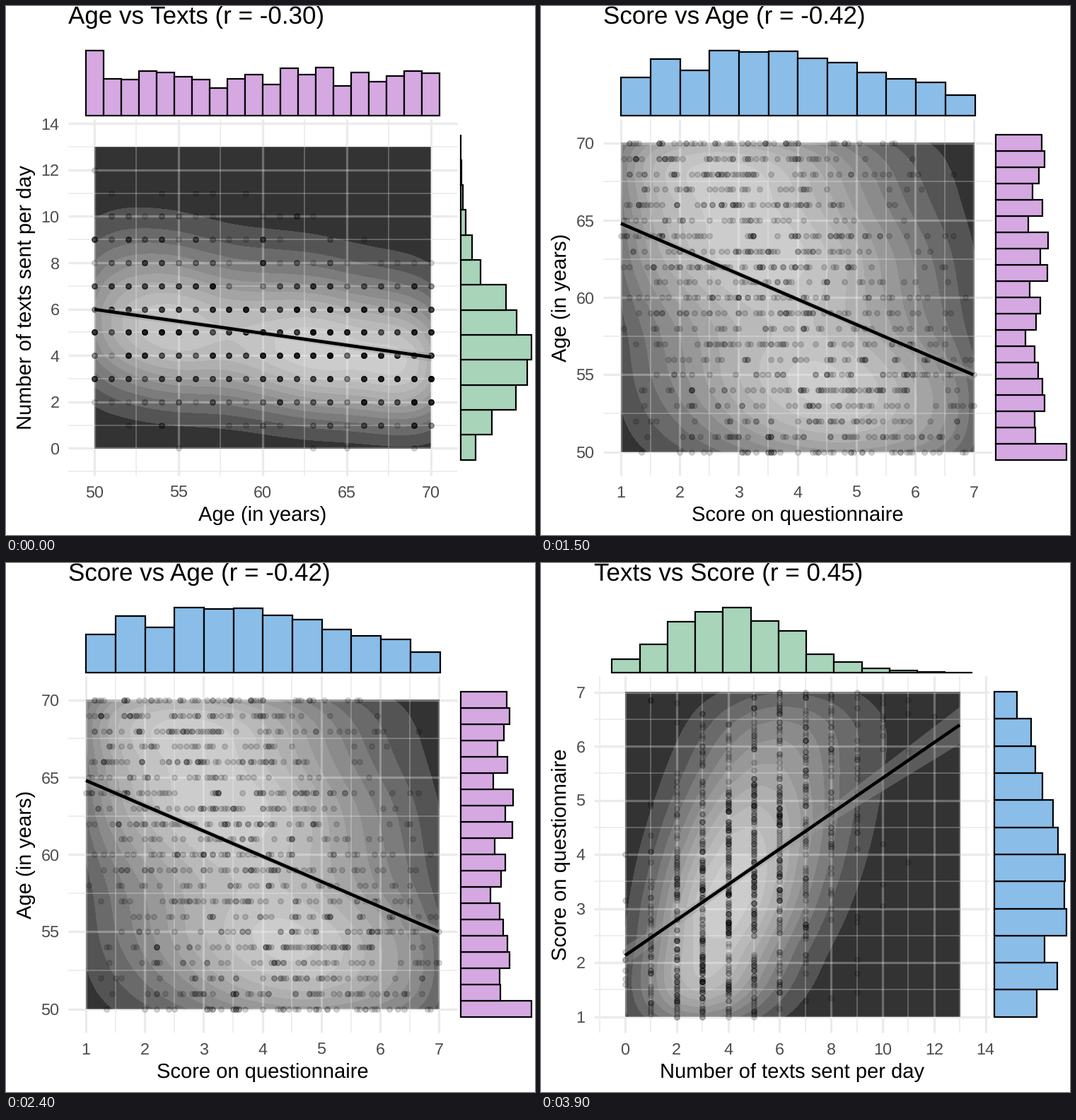
A matplotlib script for the animation above (4500 ms loop, 748x748 px).

```python
import math

import numpy as np
import matplotlib.pyplot as plt
from matplotlib.animation import FuncAnimation

SIZE, DPI = 748, 100
PX = 72 / DPI  # points per pixel
plt.rcParams["font.family"] = "Liberation Sans"
plt.rcParams["text.hinting"] = "none"

PURPLE, GREEN, BLUE = "#d5a8e2", "#a8d4ba", "#8abde8"
TOP, BOTTOM = 160, 664
PEOPLE, LEVELS = 1000, 11
DOT_ALPHA = 0.15

# Histogram heights relative to the tallest bar
AGE = [1, .56, .55, .69, .66, .60, .55, .42, .57, .63,
       .48, .73, .63, .74, .46, .66, .52, .61, .69, .65]
TEXTS = [.21, .44, .78, .94, 1, .79, .64, .28, .16, .07, .035, .015, .005]
SCORE = [.585, .87, .695, 1, .973, .984, .885, .815, .665, .567, .507, .317]

# Possible values of each variable and how often they occur
ages, texts, scores = np.arange(50, 71), np.arange(14), np.linspace(1, 7, 121)
age_weight = np.array([0.5, 0.5] + AGE[1:])  # the first bar holds two ages
score_weight = np.interp(scores, np.arange(1.25, 7, 0.5), SCORE)

# Smoothing width of the density for each variable
AGE_H, TEXTS_H, SCORE_H = 1.65, 0.57, 0.41

fig = plt.figure(figsize=(SIZE / DPI, SIZE / DPI), dpi=DPI, facecolor="white")


def grey(k):
    lo, hi = 0.2**2.2, 0.8**2.2
    return str((lo + (hi - lo) * k / (LEVELS - 1)) ** (1 / 2.2))


def bell(z):
    return np.exp(-z * z / 2)


def text_chances(mean, n=26):
    """Binomial chance of each number of texts, one row per mean."""
    p = mean[:, None] / n
    ways = np.array([math.comb(n, int(t)) for t in texts])
    return ways * p**texts * (1 - p) ** (n - texts)


class Plot:
    """One scatter plot with marginal histograms, laid out in pixels."""

    def __init__(self, left, right, x0, kx, y0, ky):
        self.left, self.right = left, right
        self.x = lambda v: x0 + kx * np.asarray(v)
        self.y = lambda v: y0 - ky * np.asarray(v)
        self.ax = fig.add_axes([0, 0, 1, 1])
        self.ax.set(xlim=(0, SIZE), ylim=(SIZE, 0))
        self.ax.axis("off")

    def lines(self, xs, ys, xspan, yspan, **style):
        self.ax.vlines(self.x(xs), *yspan, **style)
        self.ax.hlines(self.y(ys), *xspan, **style)

    def grid(self, xs, ys, xarea, yarea, width):
        """Grey lines on the panel, translucent white ones on the density."""
        self.lines(xs, ys, (self.left, self.right), (TOP, BOTTOM),
                   lw=width * PX, color="#ebebeb", zorder=1)
        inside = [v[(v >= a) & (v <= b)] for v, (a, b) in ((xs, xarea), (ys, yarea))]
        self.lines(*inside, self.x(xarea), self.y(yarea),
                   lw=width * PX, color="white", alpha=0.29, zorder=4)

    def density(self, joint, xs, ys, hx, hy):
        gx, gy = np.linspace(xs[0], xs[-1], 140), np.linspace(ys[0], ys[-1], 140)
        z = (bell((gx[:, None] - xs) / hx) @ joint @ bell((ys[:, None] - gy) / hy)).T
        self.ax.contourf(self.x(gx), self.y(gy), z,
                         levels=np.linspace(0, z.max() * 1.001, LEVELS + 1),
                         colors=[grey(k) for k in range(LEVELS)], zorder=2)

    def dots(self, joint, xs, ys, seed):
        rng = np.random.default_rng(seed)
        pick = rng.choice(joint.size, PEOPLE, p=joint.ravel() / joint.sum())
        i, j = np.unravel_index(pick, joint.shape)
        self.ax.scatter(self.x(xs[i]), self.y(ys[j]), s=(7.4 * PX) ** 2, lw=1.5 * PX,
                        fc=(0, 0, 0, DOT_ALPHA), ec=(0, 0, 0, DOT_ALPHA), zorder=5)

    def trend(self, start, end, mid, half, spread):
        (xa, ya), (xb, yb) = start, end
        x = np.linspace(xa, xb, 60)
        y = ya + (yb - ya) * (x - xa) / (xb - xa)
        w = np.hypot(half, spread * (x - mid))
        self.ax.fill_between(x, y - w, y + w, color="0.6", alpha=0.4, lw=0, zorder=6)
        self.ax.plot(x, y, color="black", lw=4.6 * PX, solid_capstyle="butt", zorder=7)

    def top_bars(self, heights, color, xa, xb):
        w = (xb - xa) / len(heights)
        self.ax.bar(xa + w * np.arange(len(heights)), -92 * np.array(heights), w,
                    bottom=155, align="edge", fc=color, ec="black", lw=2.2 * PX)

    def side_bars(self, widths, color, base, full, ya=641.7, yb=182.2):
        h = (yb - ya) / len(widths)
        self.ax.barh(ya + h * np.arange(len(widths)), full * np.array(widths), h,
                     left=base, align="edge", fc=color, ec="black", lw=2.2 * PX)

    def text(self, x, y, s, px, **kw):
        self.ax.text(x, y, s, fontsize=px * PX, va="baseline",
                     rotation_mode="anchor", **kw)

    def labels(self, title, xlabel, ylabel, xticks, yticks):
        self.text(self.left, 25, title, 35)
        self.text((self.left + self.right) / 2, 728, xlabel, 29.17, ha="center")
        self.text(35.5, (TOP + BOTTOM) / 2, ylabel, 29.17, ha="center", rotation=90)
        for v in xticks:
            self.text(self.x(v), 695, str(v), 23.33, ha="center", color="#4d4d4d")
        for v in yticks:
            self.text(self.left - 12.5, self.y(v) + 8.3, str(v), 23.33,
                      ha="right", color="#4d4d4d")


def age_texts():
    p = Plot(88, 638, 125 - 50 * 23.8, 23.8, 625.4, 32.8)
    joint = age_weight[:, None] * text_chances(5.95 - 0.104 * (ages - 50))
    area = (50, 70), (0, 13)
    p.grid(np.arange(52.5, 70, 5), np.arange(-1, 14, 2), *area, 1.6)
    p.grid(np.arange(50, 71, 5), np.arange(0, 15, 2), *area, 3.2)
    p.density(joint, ages, texts, AGE_H, TEXTS_H)
    p.dots(joint, ages, texts, seed=4)
    p.trend((125, 429), (601, 496.5), 363, 3.5, 0.02)
    p.top_bars(AGE, PURPLE, 112.7, 613.2)
    p.side_bars(TEXTS, GREEN, 643, 100)
    p.labels("Age vs Texts (r = -0.30)", "Age (in years)", "Number of texts sent per day",
             range(50, 71, 5), range(0, 15, 2))
    return p.ax


def score_age():
    p = Plot(88, 638, 113 - 83.25, 83.25, 630.5 + 50 * 21.83, 21.83)
    joint = bell((scores[:, None] - 3.7 + 0.12 * (ages - 60)) / 1.75)
    joint *= age_weight / joint.sum(axis=0)
    area = (1, 7), (50, 70)
    p.grid(np.arange(1.5, 7, 1), np.arange(52.5, 70, 5), *area, 1.6)
    p.grid(np.arange(1, 8), np.arange(50, 71, 5), *area, 3.2)
    p.density(joint, scores, ages, SCORE_H, AGE_H)
    p.dots(joint, scores, ages, seed=11)
    p.trend((113, 307.5), (611.5, 521.5), 340, 4, 0.025)
    p.top_bars(SCORE, BLUE, 113.2, 613.5)
    p.side_bars(AGE, PURPLE, 643, 100)
    p.labels("Score vs Age (r = -0.42)", "Score on questionnaire", "Age (in years)",
             range(1, 8), range(50, 71, 5))
    return p.ax


def texts_score():
    p = Plot(75, 634.5, 119, 36.4, 641.5 + 76.5, 76.5)
    joint = (score_weight[:, None] * text_chances(4.6 + 0.62 * (scores - 3.65))).T
    area = (0, 13), (1, 7)
    p.grid(np.arange(-1, 14, 2), np.arange(1.5, 7, 1), *area, 1.6)
    p.grid(np.arange(0, 15, 2), np.arange(1, 8), *area, 3.2)
    p.density(joint, texts, scores, TEXTS_H, SCORE_H)
    p.dots(joint, texts, scores, seed=7)
    p.trend((119, 555), (592, 229), 280, 5, 0.082)
    p.top_bars(TEXTS, GREEN, 100.3, 610.5)
    p.side_bars(SCORE, BLUE, 641, 102)
    p.labels("Texts vs Score (r = 0.45)", "Number of texts sent per day",
             "Score on questionnaire", range(0, 15, 2), range(1, 8))
    return p.ax


scenes = [age_texts(), score_age(), texts_score()]


def show(i):
    for k, ax in enumerate(scenes):
        ax.set_visible(k == i)
    return scenes


anim = FuncAnimation(fig, show, frames=len(scenes), interval=1500,
                     repeat=True, repeat_delay=0, blit=False)
plt.show()
```
